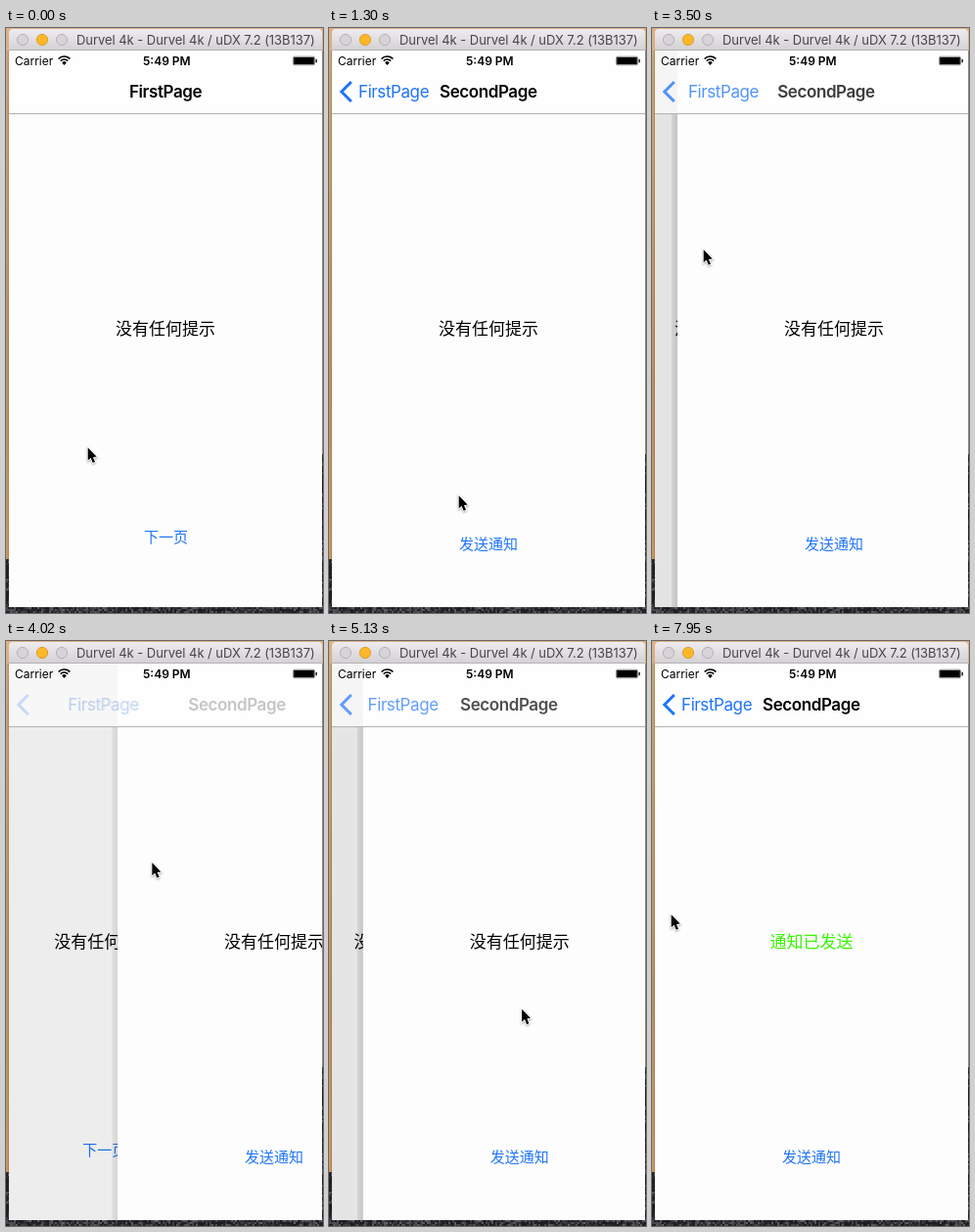
Write an HTML page with a canvas that moves like this. It is 324x597 px and loops after 8000 ms.

```html
<!DOCTYPE html>
<html lang="zh">
<head>
<meta charset="utf-8">
<title>Swipe back</title>
<style>
html, body { margin: 0; width: 100%; height: 100%; overflow: hidden; background: #fff; }
canvas { display: block; width: 324px; height: 597px; }
</style>
</head>
<body>
<canvas id="stage"></canvas>
<script>
const W = 324, H = 597, LOOP = 8000, STEP = 87.3;
const BLUE = '#1f74fb', PAGE = '#fdfdfd';
const SANS = 'Inter, "Liberation Sans", sans-serif';
const CJK = '"Noto Sans CJK SC", "Noto Sans CJK", sans-serif';
const canvas = document.getElementById('stage');
const ctx = canvas.getContext('2d');
const dpr = window.devicePixelRatio || 1;
canvas.width = W * dpr;
canvas.height = H * dpr;

// Moments, in refresh steps
const PUSH = 9, PUSHED = 15, GRAB = 40, HOLD = 54, RELEASE = 56, SETTLED = 61, SENT = 71;

// Where the hand pauses or turns: step, x, y
const stops = [
  [0, 84, 428], [8, 159, 515], [PUSHED, 133, 477], [22, 17, 376], [29, 97, 352],
  [38, 13, 230], [39, 13, 230], [GRAB, 53, 226], [HOLD, 221, 226], [68, 173, 530],
  [SENT, 168, 523], [78, 21, 312], [83, 16, 297], [87, 108, 290], [91, 20, 279]
];

function easeOut(s, from, to, power) {
  const u = Math.min(1, Math.max(0, (s - from) / (to - from)));
  return 1 - (1 - u) ** power;
}

function pageOffset(s) {
  if (s < GRAB) return 320 * (1 - easeOut(s, PUSH, PUSHED, 2));
  if (s < RELEASE) return 23 + 176 * easeOut(s, GRAB, HOLD, 1.24);
  return 199 * (1 - easeOut(s, RELEASE, SETTLED, 2));
}

function pointerAt(s) {
  const i = Math.max(1, stops.findIndex(k => k[0] >= s));
  const [t0, x0, y0] = stops[i - 1], [t1, x1, y1] = stops[i];
  const f = easeOut(s, t0, t1, 1.53);
  return [x0 + (x1 - x0) * f, y0 + (y1 - y0) * f];
}

function rect(x, y, w, h, fill) {
  ctx.fillStyle = fill;
  ctx.fillRect(x, y, w, h);
}

function text(str, x, y, font, fill, spacing = 0, alpha = 1) {
  ctx.globalAlpha = alpha;
  ctx.font = font;
  ctx.letterSpacing = spacing + 'px';
  ctx.fillStyle = fill;
  ctx.fillText(str, x, y);
  ctx.globalAlpha = 1;
}

function shade(x0, y0, x1, y1, ...colors) {
  const g = ctx.createLinearGradient(x0, y0, x1, y1);
  colors.forEach((c, i) => g.addColorStop(i / (colors.length - 1), c));
  return g;
}

function black(alpha) {
  return `rgba(0,0,0,${alpha})`;
}

// Sand above, dark rock below
function rock(x, y, w, h) {
  for (let i = 0; i < w; i += 2) {
    for (let j = 0; j < h; j += 2) {
      const n = Math.abs(Math.sin((x + i) * 12.99 + (y + j) * 78.23) * 437.6) % 1;
      const v = 28 + 70 * n * n;
      rect(x + i, y + j, 2, 2, `rgb(${v},${v},${v + 4})`);
    }
  }
}

function desktop() {
  rect(0, 0, W, H, shade(0, 0, 0, 542, '#dcb184', '#d5a473', '#cd9a69', '#d9a264'));
  rect(0, 23, 3, 519, shade(0, 0, 3, 0, black(0), black(.2)));
  rect(322, 23, 2, 412, '#958c85');
  rock(0, 542, 4, 50);
  rock(322, 435, 2, 156);
  rock(0, 591, W, 6);
}

function light(x, fill, line) {
  ctx.beginPath();
  ctx.arc(x, 12, 5.6, 0, 7);
  ctx.fillStyle = fill;
  ctx.fill();
  ctx.strokeStyle = line;
  ctx.lineWidth = 1;
  ctx.stroke();
}

function titleBar() {
  ctx.beginPath();
  ctx.roundRect(3, 1, 320, 22, [4, 4, 0, 0]);
  ctx.fillStyle = shade(0, 1, 0, 23, '#eeecee', '#d3d1d3');
  ctx.fill();
  rect(3, 22, 320, 1, '#b3b1b3');
  light(17, '#d6d4d6', '#b4b2b4');
  light(37, '#fdb827', '#dc9d30');
  light(57, '#d6d4d6', '#b4b2b4');
  text('Durvel 4k - Durvel 4k / uDX 7.2 (13B137)', 72, 17, '13px ' + SANS, '#474547', -.05);
}

function statusBar() {
  text('Carrier', 9, 38, '12px ' + SANS, '#000');
  text('5:49 PM', 140, 38, '600 12px ' + SANS, '#000');
  ctx.strokeStyle = '#000';
  ctx.lineWidth = 1.7;
  for (const r of [8, 5]) {
    ctx.beginPath();
    ctx.arc(59.5, 37, r, -Math.PI * .76, -Math.PI * .24);
    ctx.stroke();
  }
  ctx.beginPath();
  ctx.moveTo(59.5, 38);
  ctx.arc(59.5, 37.5, 3.2, -Math.PI * .76, -Math.PI * .24);
  ctx.fillStyle = '#000';
  ctx.fill();
  ctx.beginPath();
  ctx.roundRect(293.5, 29.2, 22, 8.6, 1.5);
  ctx.strokeStyle = black(.55);
  ctx.lineWidth = .8;
  ctx.stroke();
  rect(294.2, 29.9, 20.6, 7.2, '#000');
  rect(316.5, 31.8, 1.3, 3.5, '#000');
}

function navBar(p) {
  rect(3, 23, 320, 64, '#fefefe');
  // The dimmed page shows faintly through the bar
  rect(3, 23, 320 * p, 64, black(.04 * (1 - p)));
  rect(3, 87, 320, 1, '#b2b2b2');
  const fade = (1 - p) ** 3.5, x = 30 + 96 * p;
  ctx.globalAlpha = fade;
  ctx.strokeStyle = BLUE;
  ctx.lineWidth = 3;
  ctx.beginPath();
  ctx.moveTo(22.8, 55);
  ctx.lineTo(12.8, 65);
  ctx.lineTo(22.8, 75);
  ctx.stroke();
  text('FirstPage', x, 71, '17px ' + SANS, BLUE, -.41, fade);
  text('FirstPage', x, 71, '600 17px ' + SANS, '#000', -.41, p ** 3);
  text('SecondPage', 113 + 211 * p, 71, '600 17px ' + SANS, '#000', -.41, fade);
}

function firstPage(p) {
  const dx = -96 * (1 - p);
  rect(3, 88, 320, 503, PAGE);
  text('没有任何提示', 112 + dx, 313, '17px ' + CJK, '#000');
  text('下一页', 141 + dx, 525, '15px ' + CJK, BLUE);
  rect(3, 88, 320, 503, black(.107 * (1 - p) ** 1.25));
}

function secondPage(x, sent) {
  const depth = 1 - x / 320;
  if (x > 0) rect(x - 3, 88, 6, 503, shade(x - 3, 0, x + 3, 0, black(.07 * depth), black(.16 * depth)));
  rect(3 + x, 88, 320, 503, PAGE);
  if (sent) text('通知已发送', 120.5 + x, 313, '17px ' + CJK, '#3af400');
  else text('没有任何提示', 112 + x, 313, '17px ' + CJK, '#000');
  text('发送通知', 133 + x, 532, '15px ' + CJK, BLUE);
}

function phone(x, sent) {
  const p = x / 320;
  ctx.save();
  ctx.beginPath();
  ctx.rect(3, 23, 320, 568);
  ctx.clip();
  firstPage(p);
  if (x < 320) secondPage(x, sent);
  navBar(p);
  statusBar();
  ctx.restore();
}

function pointer(x, y) {
  ctx.save();
  ctx.translate(x - .3, y + .3);
  ctx.beginPath();
  [[0, 0], [0, 13], [2.9, 10.4], [5, 15.5], [7.3, 14.5], [5.2, 9.7], [9, 9.3]]
    .forEach(q => ctx.lineTo(...q));
  ctx.closePath();
  ctx.shadowColor = black(.35);
  ctx.shadowBlur = 2 * dpr;
  ctx.shadowOffsetY = dpr;
  ctx.strokeStyle = '#fff';
  ctx.lineWidth = 1.8;
  ctx.stroke();
  ctx.shadowColor = 'transparent';
  ctx.fillStyle = '#000';
  ctx.fill();
  ctx.restore();
}

function draw(ms) {
  const s = Math.floor(ms / STEP + .25);
  ctx.setTransform(dpr, 0, 0, dpr, 0, 0);
  desktop();
  titleBar();
  phone(pageOffset(s), s >= SENT);
  pointer(...pointerAt(s));
}

const start = performance.now();
function tick() {
  draw((performance.now() - start) % LOOP);
  requestAnimationFrame(tick);
}
tick();
</script>
</body>
</html>
```
